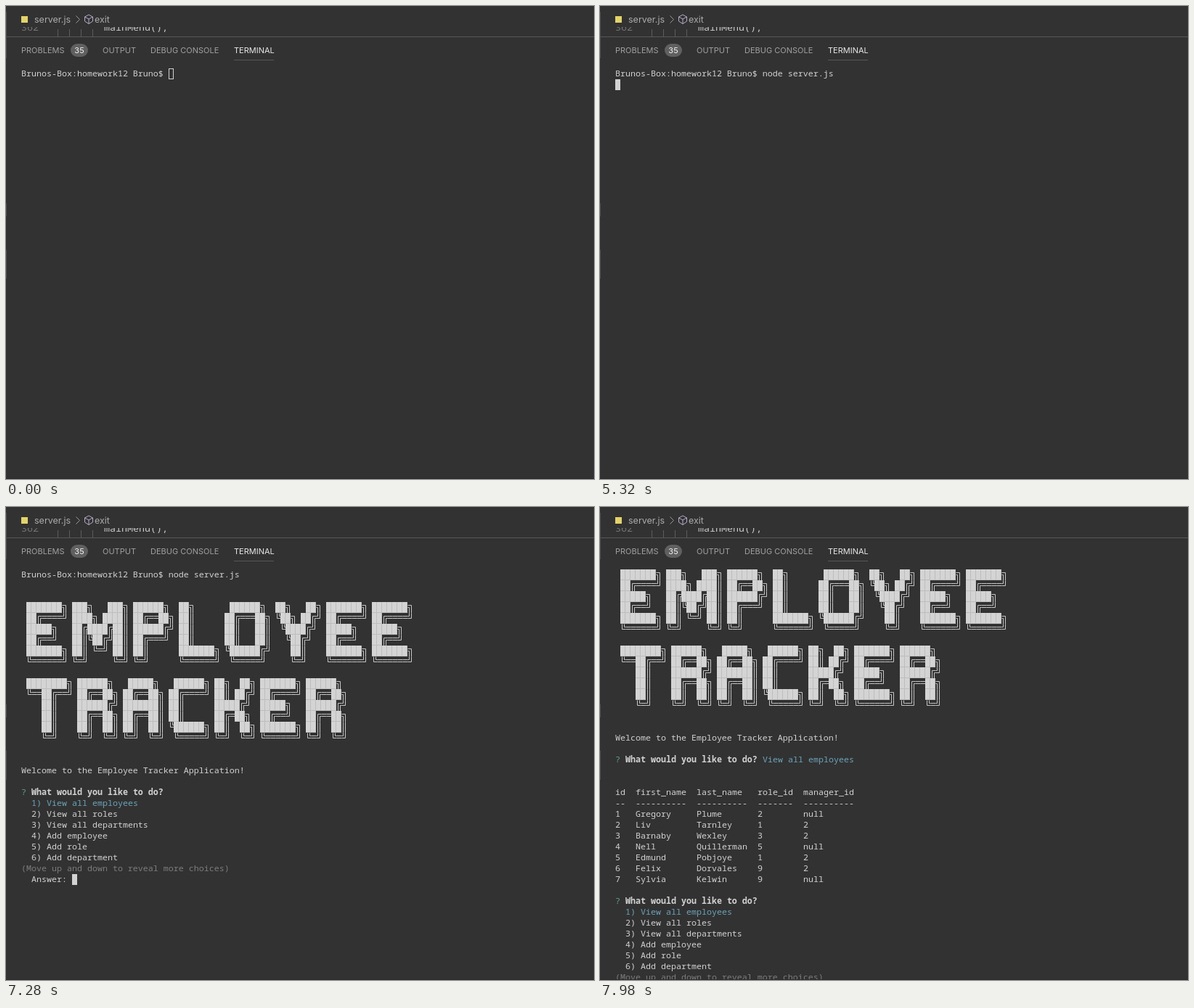
These frames come from a looping animation (810 px wide and 652 px high, 8 s). An HTML page with a canvas:

```html
<!DOCTYPE html>
<html lang="en">
<head>
<meta charset="utf-8">
<title>Employee Tracker</title>
<style>
  html, body { margin: 0; width: 100%; height: 100%; overflow: hidden; background: #323232; }
  canvas { display: block; }
</style>
</head>
<body>
<canvas id="stage" width="810" height="652"></canvas>
<script>
const ctx = document.getElementById("stage").getContext("2d");
const LOOP = 8000, LEFT = 21, TOP = 86, CELL_W = 7, CELL_H = 15;
const BG = "#323232", FG = "#d2d2d2", BLUE = "#6ca3b9", GREEN = "#649f8f", DIM = "#7c7c7c";
const MONO = '"Noto Sans Mono", "DejaVu Sans Mono", monospace';
const SANS = "Inter, Roboto, sans-serif";

const PROMPT = "Brunos-Box:homework12 Bruno$ ";
const COMMAND = "node server.js";
// [time, characters typed]
const TYPING = [[2310, 1], [2380, 2], [2450, 3], [2520, 4], [2590, 5], [2730, 7],
  [2800, 8], [2870, 10], [3010, 12], [3080, 13], [3150, 14]];
const FOCUS = 1610, ENTER = 3850, BANNER = 5390, CHOSEN = 7770, TABLE = 7840;

const GLYPHS = {
  E: "███████╗|██╔════╝|█████╗  |██╔══╝  |███████╗|╚══════╝",
  M: "███╗   ███╗|████╗ ████║|██╔████╔██║|██║╚██╔╝██║|██║ ╚═╝ ██║|╚═╝     ╚═╝",
  P: "██████╗ |██╔══██╗|██████╔╝|██╔═══╝ |██║     |╚═╝     ",
  L: "██╗     |██║     |██║     |██║     |███████╗|╚══════╝",
  O: " ██████╗ |██╔═══██╗|██║   ██║|██║   ██║|╚██████╔╝| ╚═════╝ ",
  Y: "██╗   ██╗|╚██╗ ██╔╝| ╚████╔╝ |  ╚██╔╝  |   ██║   |   ╚═╝   ",
  T: "████████╗|╚══██╔══╝|   ██║   |   ██║   |   ██║   |   ╚═╝   ",
  R: "██████╗ |██╔══██╗|██████╔╝|██╔══██╗|██║  ██║|╚═╝  ╚═╝",
  A: " █████╗ |██╔══██╗|███████║|██╔══██║|██║  ██║|╚═╝  ╚═╝",
  C: " ██████╗|██╔════╝|██║     |██║     |╚██████╗| ╚═════╝",
  K: "██╗  ██╗|██║ ██╔╝|█████╔╝ |██╔═██╗ |██║  ██╗|╚═╝  ╚═╝"
};
const BOX = {
  "═": "M0 4H7M0 7H7",
  "║": "M2 0V15M5 0V15",
  "╔": "M7 4H2V15M7 7H5V15",
  "╗": "M0 4H5V15M0 7H2V15",
  "╚": "M2 0V7H7M5 0V4H7",
  "╝": "M5 0V7H0M2 0V4H0"
};

const CHOICES = ["View all employees", "View all roles", "View all departments",
  "Add employee", "Add role", "Add department"];
const COLUMNS = [0, 4, 16, 28, 37];
const RECORDS = `id first_name last_name role_id manager_id
-- ---------- ---------- ------- ----------
1 Gregory Plume 2 null
2 Liv Tarnley 1 2
3 Barnaby Wexley 3 2
4 Nell Quillerman 5 null
5 Edmund Pobjoye 1 2
6 Felix Dorvales 9 2
7 Sylvia Kelwin 9 null`.split("\n").map(line => line.split(" "));

let scroll = 0;
const cellX = col => LEFT + col * CELL_W;
const cellY = row => TOP + (row - scroll) * CELL_H;

function rect(x, y, w, h, color) {
  ctx.fillStyle = color;
  ctx.fillRect(x, y, w, h);
}

function label(text, x, y, font, color) {
  ctx.font = font;
  ctx.fillStyle = color;
  ctx.fillText(text, x, y);
}

function print(row, col, text, color = FG, weight = 400) {
  // 11.667px gives an advance of one cell
  label(text, cellX(col), cellY(row) + 11, `${weight} 11.667px ${MONO}`, color);
}

function cursor(row, col, solid = true) {
  if (solid) return rect(cellX(col), cellY(row), CELL_W, CELL_H, FG);
  ctx.strokeStyle = FG;
  ctx.lineWidth = 1;
  ctx.strokeRect(cellX(col) + .5, cellY(row) + .5, CELL_W - 1, CELL_H - 1);
}

function stroke(path, color, x = 0, y = 0) {
  ctx.save();
  ctx.translate(x + .5, y + .5);
  ctx.strokeStyle = color;
  ctx.lineWidth = 1;
  ctx.stroke(new Path2D(path));
  ctx.restore();
}

function bannerWord(word, top) {
  const letters = [...word].map(c => GLYPHS[c].split("|"));
  for (let i = 0; i < 6; i++) {
    const line = letters.map(rows => rows[i]).join(" ");
    [...line].forEach((c, j) => {
      const x = cellX(j + 1), y = cellY(top + i);
      if (c === "█") {
        rect(x, y, CELL_W, CELL_H, "#bdbdbd");
        rect(x, y, CELL_W - 1, CELL_H - 1, "#d4d4d4");
      } else if (BOX[c]) stroke(BOX[c], "#c4c4c4", x, y);
    });
  }
}

function question(row) {
  print(row, 0, "?", GREEN);
  print(row, 2, "What would you like to do?", FG, 700);
}

function menu(row) {
  question(row);
  CHOICES.forEach((text, i) => print(row + 1 + i, 2, `${i + 1}) ${text}`, i ? FG : BLUE));
  print(row + 7, 0, "(Move up and down to reveal more choices)", DIM);
  print(row + 8, 2, "Answer: ");
  cursor(row + 8, 10);
}

function terminal(t) {
  const typed = TYPING.filter(([time]) => t >= time).length;
  const count = typed ? TYPING[typed - 1][1] : 0;
  scroll = t >= TABLE ? 3 : 0;
  if (!scroll) print(0, 0, PROMPT + COMMAND.slice(0, count));
  if (t < ENTER) return cursor(0, PROMPT.length + count, t >= FOCUS);
  if (t < BANNER) return cursor(1, 0);

  bannerWord("EMPLOYEE", 3);
  bannerWord("TRACKER", 10);
  print(18, 0, "Welcome to the Employee Tracker Application!");
  if (t < CHOSEN) return menu(20);

  question(20);
  print(20, 29, CHOICES[0], BLUE);
  if (t < TABLE) return cursor(23, 0);

  RECORDS.forEach((cells, i) => cells.forEach((text, j) => print(23 + i, COLUMNS[j], text)));
  menu(33);
}

function editor() {
  // Code line, half hidden by the breadcrumb bar
  label("362", 21, 34, `13.333px ${MONO}`, "#747474");
  label("mainMenu();", 135, 34, `13.333px ${MONO}`, "#c8c8c8");
  rect(0, 0, 810, 29, BG);
  for (let x = 71; x < 120; x += 16) rect(x, 32, 1, 10, "#5c5c5c");
  rect(0, 42, 810, 1, "#585858");

  rect(21, 14, 9, 9, "#e3d36b");
  label("server.js", 39, 23, `12.5px ${SANS}`, "#ababab");
  stroke("M96 13L101 18L96 23", "#9a9a9a");
  stroke("M113.5 11.5L119 14.5V20.5L113.5 24L108 20.5V14.5ZM108 14.5L113.5 17.5L119 14.5M113.5 17.5V24", "#b5abc9");
  label("exit", 122, 23, `12.5px ${SANS}`, "#ababab");
}

function tabs() {
  const font = `11px ${SANS}`;
  [["PROBLEMS", 21], ["OUTPUT", 133], ["DEBUG CONSOLE", 199], ["TERMINAL", 314]]
    .forEach(([text, x]) => label(text, x, 65, font, text === "TERMINAL" ? "#e8e8e8" : "#a0a0a0"));
  rect(314, 74, 55, 1, "#585858");
  ctx.fillStyle = "#606060";
  ctx.beginPath();
  ctx.roundRect(89, 52, 24, 18, 9);
  ctx.fill();
  ctx.textAlign = "center";
  label("35", 101, 65, font, "#f0f0f0");
  ctx.textAlign = "left";
}

function draw(t) {
  rect(0, 0, 810, 652, BG);
  terminal(t);
  editor();
  tabs();
  [[8, 64], [272, 18], [336, 40]].forEach(([y, h]) => rect(0, y, 1, h, "#4c4c4c"));
  rect(0, 651, 810, 1, "#2b2b2b");
}

const start = performance.now();
function tick() {
  draw((performance.now() - start) % LOOP);
  requestAnimationFrame(tick);
}
tick();
</script>
</body>
</html>
```
